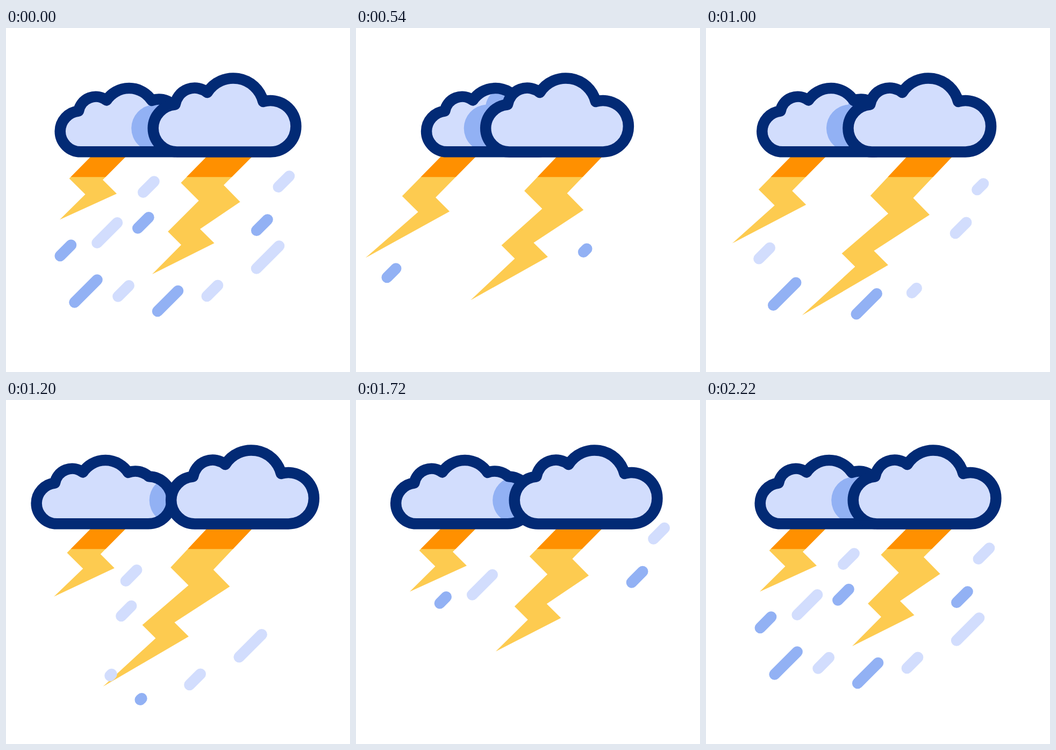
Write an HTML page that moves like this. It is 640 by 640 pixels and loops after 2400 ms.

```html
<!DOCTYPE html>
<html lang="en">
<head>
<meta charset="utf-8">
<title>Thunderstorm</title>
<style>
html, body { margin: 0; width: 100%; height: 100%; overflow: hidden; background: #fff; }
svg { display: block; width: 100%; height: 100%; }
.cloud { fill: #d2ddfd; }
.line { fill: none; stroke: #022a75; stroke-width: 20.5; stroke-linejoin: round; }
.bolt { fill: #fdcb50; }
.shade { fill: #ff9000; }
.rain { fill: none; stroke-width: 20.5; stroke-linecap: round; }
</style>
</head>
<body>
<svg viewBox="0 0 640 640">
  <defs>
    <path id="backShape" d="M139 230.3A38.2 38.2 0 0 1 100.7 192.1A38.2 38.2 0 0 1 135 154.5A32.6 32.6 0 0 1 187 134.5A50.5 50.5 0 0 1 271.3 135A37 37 0 0 1 309.8 142.3A44 44 0 0 1 352.7 186.4A44 44 0 0 1 308.7 230.3Z"/>
    <path id="frontShape" d="M318 230.5A44.2 44.2 0 0 1 273.7 186.3A44.2 44.2 0 0 1 314.5 142.5A37 37 0 0 1 374.5 120A57.3 57.3 0 0 1 478.5 137A47.4 47.4 0 0 1 539.4 183.1A47.4 47.4 0 0 1 492 230.5Z"/>
    <clipPath id="backClip"><use href="#backShape"/></clipPath>
    <clipPath id="band"><rect y="200" width="640" height="77.3"/></clipPath>
  </defs>
  <g id="bolts"></g>
  <g id="drops" class="rain"></g>
  <g id="back">
    <use href="#backShape" class="cloud"/>
    <g clip-path="url(#backClip)"><use id="shadow" href="#frontShape" fill="#92b1f4"/></g>
    <use href="#backShape" class="line"/>
  </g>
  <g id="front">
    <use href="#frontShape" class="cloud"/>
    <use href="#frontShape" class="line"/>
  </g>
</svg>
<script>
const LOOP = 2400, STEP = 20, LAST = 2220;
const LIGHT = '#d2ddfd', BLUE = '#92b1f4';
const START = [60, -48], REST = [0, 0], END = [-43, 40];
const TRIM = 70;

const $ = id => document.getElementById(id);
const clamp = v => Math.max(0, Math.min(1, v));
const mix = (a, b, p) => a + (b - a) * p;
const shift = (el, x) => el.setAttribute('transform', `translate(${x.toFixed(2)} 0)`);

// eased progress from time a to time b
function ease(t, a, b) {
  const v = clamp((t - a) / (b - a));
  return v * v * (3 - 2 * v);
}

function add(parent, attrs) {
  const el = document.createElementNS('http://www.w3.org/2000/svg', 'path');
  for (const k in attrs) el.setAttribute(k, attrs[k]);
  return parent.appendChild(el);
}

// clouds swing together, then apart, then back to rest
function sway(t, near, far) {
  return near * ease(t, 0, 690) + (far - near) * ease(t, 790, 1330) - far * ease(t, 1410, 2000);
}

// outline points: x, y, index into the stretch vectors
const bolts = [
  {
    grow: [148, 588], shrink: [748, 1330],
    pull: [[0, 0], [-33, 34], [-85, 73.5]],
    points: [[167, 230, 0], [117.7, 280, 1], [147.5, 309.5, 1], [100, 356.5, 2],
             [206, 308.3, 1], [180, 282.5, 1], [232, 230, 0]]
  },
  {
    grow: [206, 775], shrink: [1136, 1889],
    pull: [[0, 0], [-19.6, 24], [-48.6, 40.6], [-93.3, 76.6]],
    points: [[382.5, 230, 0], [325.4, 288, 1], [358.7, 321.2, 1], [301.2, 378.8, 2],
             [326, 403.5, 2], [272, 458, 3], [387.5, 400.3, 2], [361, 374, 2],
             [435.6, 323.5, 1], [405, 292.3, 1], [467, 230, 0]]
  }
];
for (const b of bolts) {
  b.body = add($('bolts'), { class: 'bolt' });
  b.top = add($('bolts'), { class: 'shade', 'clip-path': 'url(#band)' });
}

// each drop falls three times: out of the rest pose, right through, back into it
const falls = [[0, 450, REST, END], [504, 1374, START, END], [1493, 2240, START, REST]];

// upper end, length and colour, in order of appearance
const drops = [
  [207, 362.3, 37.5, LIGHT],
  [527, 275.5, 20.3, LIGHT],
  [486.5, 356.5, 20.3, BLUE],
  [121, 403.7, 20.3, BLUE],
  [169.5, 468.5, 42, BLUE],
  [320, 489, 38, BLUE],
  [394, 478.8, 20.3, LIGHT],
  [508, 405.5, 42, LIGHT],
  [275.5, 285.5, 20.3, LIGHT],
  [265.5, 352.2, 20.3, BLUE],
  [228.7, 479.2, 20.3, LIGHT]
].map(([x, y, len, color], i, all) => {
  const long = len > 30;
  const early = (i + 7) % all.length;
  const mid = 640 + 55 * i;
  const spans = [
    [-TRIM, 237 + 36 * early],
    [mid, mid + (long ? 290 : 345)],
    [1506 + 57.7 * i, Infinity]
  ];
  return spans.map(([from, to], n) => {
    const stroke = n === 1 && !long ? LIGHT : color;
    return { x, y, len, from, to, el: add($('drops'), { stroke }) };
  });
});

function drawBolt(b, t) {
  const p = ease(t, ...b.grow) - ease(t, ...b.shrink);
  const d = 'M' + b.points.map(([x, y, i]) =>
    `${(x + b.pull[i][0] * p).toFixed(2)} ${(y + b.pull[i][1] * p).toFixed(2)}`).join('L') + 'Z';
  b.body.setAttribute('d', d);
  b.top.setAttribute('d', d);
}

// drawn from the upper end down, erased the same way
function drawDrop(drop, [dx, dy], t) {
  const head = clamp((t - drop.from) / TRIM) * drop.len;
  const tail = clamp((t - drop.to + TRIM) / TRIM) * drop.len;
  const x = drop.x + dx, y = drop.y + dy;
  drop.el.setAttribute('d', head > tail ? `M${x - tail} ${y + tail}L${x - head} ${y + head}` : '');
}

function render(t) {
  const fx = sway(t, -37, 45.5), bx = sway(t, 34.5, -57.5);
  shift($('front'), fx);
  shift($('back'), bx);
  shift($('shadow'), fx - bx - 40.5);
  bolts.forEach(b => drawBolt(b, t));
  falls.forEach(([t0, t1, a, b], n) => {
    const p = ease(t, t0, t1);
    const offset = [mix(a[0], b[0], p), mix(a[1], b[1], p)];
    drops.forEach(d => drawDrop(d[n], offset, t));
  });
}

const begin = performance.now();
function tick() {
  const t = (performance.now() - begin) % LOOP;
  render(Math.min(LAST, Math.floor(t / STEP) * STEP));
  requestAnimationFrame(tick);
}
tick();
</script>
</body>
</html>
```
